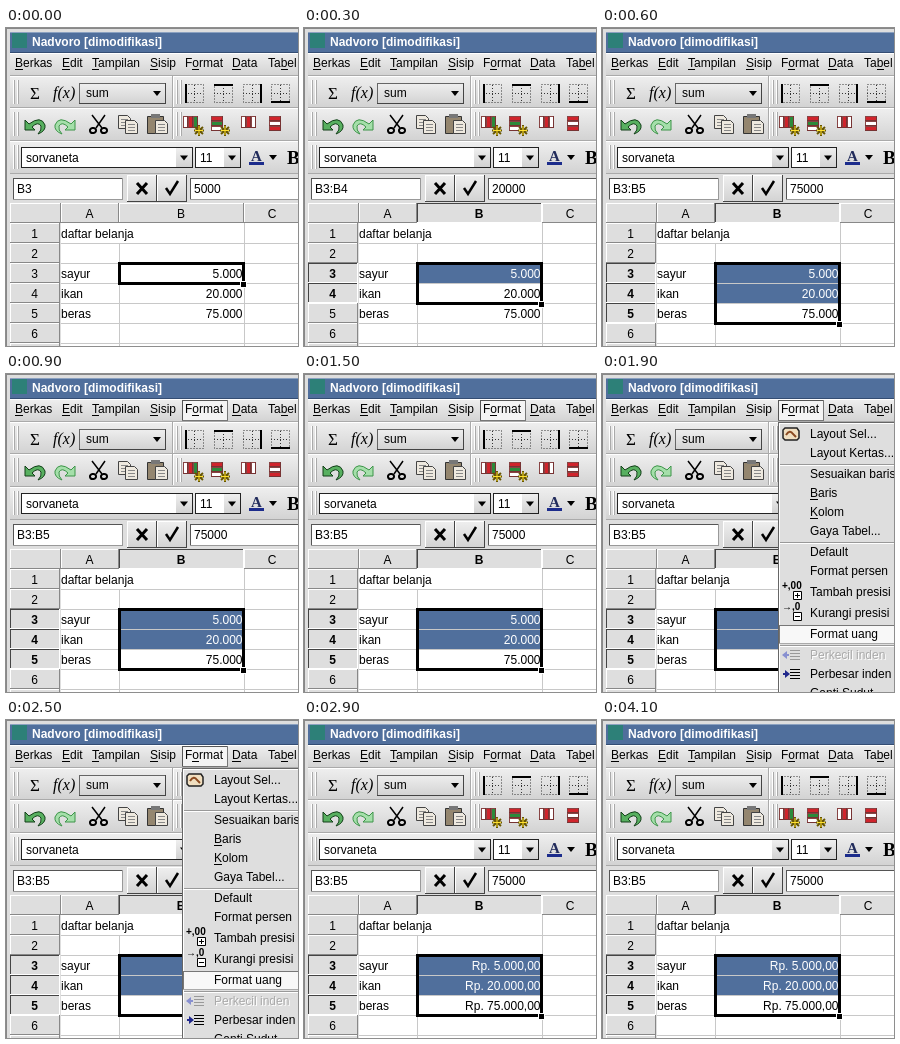
An HTML page with a canvas that plays this animation: 292x318 px, repeating every 4.9 s.

```html
<!DOCTYPE html>
<html lang="id">
<head>
<meta charset="utf-8">
<style>
html, body { margin: 0; width: 100%; height: 100%; overflow: hidden; }
canvas { display: block; }
</style>
</head>
<body>
<canvas width="292" height="318"></canvas>
<script>
const ctx = document.querySelector('canvas').getContext('2d');
const FACE = '#dedede', BLUE = '#506f9c', INK = '#000', GREEN = '#2b8a3a', RED = '#d0242c', LINE = '#c8c8c8';
const SANS = '"Liberation Sans", Arial, sans-serif';
const SERIF = '"Liberation Serif", serif';
const LOOP = 4900;

const steps = [
  { at: 0, last: 3, value: '5000' },
  { at: 300, last: 4, value: '20000' },
  { at: 600, last: 5, value: '75000' },
  { at: 900, last: 5, value: '75000', active: true },
  { at: 1900, last: 5, value: '75000', active: true, popup: true },
  { at: 2900, last: 5, value: '75000', money: true }
];

function box(x, y, w, h, color) {
  ctx.fillStyle = color;
  ctx.fillRect(x, y, w, h);
}

function shade(x, y, w, h, top = '#efefef', bottom = '#d2d2d2') {
  const g = ctx.createLinearGradient(0, y, 0, y + h);
  g.addColorStop(0, top);
  g.addColorStop(1, bottom);
  box(x, y, w, h, g);
}

function frame(x, y, w, h, light, dark) {
  box(x, y, w, 1, light);
  box(x, y, 1, h, light);
  box(x, y + h - 1, w, 1, dark);
  box(x + w - 1, y, 1, h, dark);
}

function text(s, x, y, { color = INK, align = 'left', style = '', size = 12, family = SANS } = {}) {
  ctx.font = `${style} ${size}px ${family}`;
  ctx.textAlign = align;
  ctx.fillStyle = color;
  ctx.fillText(s, x, y);
}

// Menu text with its shortcut letter underlined
function label(s, x, y, key) {
  text(s, x, y);
  if (key === undefined) return;
  const left = x + ctx.measureText(s.slice(0, key)).width;
  box(Math.round(left), y + 2, Math.round(ctx.measureText(s[key]).width), 1, INK);
}

function path(d, stroke, width = 1, fill) {
  const p = new Path2D(d);
  if (fill) { ctx.fillStyle = fill; ctx.fill(p); }
  if (stroke) { ctx.strokeStyle = stroke; ctx.lineWidth = width; ctx.stroke(p); }
}

function place(x, y, flip, draw) {
  ctx.save();
  ctx.translate(x, y);
  ctx.scale(flip, 1);
  draw();
  ctx.restore();
}

function arrow(x, y) {
  path(`M${x - 4} ${y - 2}h8l-4 5z`, null, 0, INK);
}

function field(x, y, w, h, s, pad = 4) {
  box(x, y, w, h, '#fff');
  frame(x, y, w, h, '#555', '#999');
  text(s, x + pad, y + h / 2 + 4);
}

function combo(x, y, w, h, s) {
  field(x, y, w, h, s, 5);
  frame(x, y, w, h, '#222', '#222');
  shade(x + w - 17, y + 1, 16, h - 2);
  arrow(x + w - 9, y + h / 2);
}

function bar(y, h) {
  shade(4, y, 288, h);
  box(4, y, 288, 1, '#fff');
  box(4, y + h - 1, 288, 1, '#aaa');
}

function handle(x, y) {
  for (const dx of [0, 4]) {
    box(x + dx, y, 1, 24, '#fff');
    box(x + dx + 1, y, 1, 24, '#aaa');
  }
}

function toolbar(y, h) {
  bar(y, h);
  handle(7, y + 4);
}

function divider(y) {
  box(166, y - 4, 1, 31, '#aaa');
  box(167, y - 4, 1, 31, '#fff');
  handle(170, y);
}

function titleBar() {
  box(4, 4, 288, 21, BLUE);
  box(4, 4, 288, 1, '#8ba1c0');
  box(4, 24, 288, 1, '#344d73');
  box(6, 5, 15, 15, '#2d8078');
  text('Nadvoro [dimodifikasi]', 26, 18, { color: '#fff', style: 'bold' });
}

function menuBar(active) {
  bar(25, 23);
  if (active) {
    box(176, 26, 46, 21, '#f4f4f4');
    frame(176, 26, 46, 21, '#555', '#777');
  }
  const items = [['Berkas', 9, 0], ['Edit', 56, 0], ['Tampilan', 86, 0], ['Sisip', 144, 0], ['Format', 179, 1], ['Data', 226, 0], ['Tabel', 262, 2]];
  for (const [s, x, key] of items) label(s, x, 39, key);
}

function borderIcon(x, side) {
  ctx.setLineDash([1, 2]);
  path(`M${x + .5} 56.5h18v18h-18zM${x + 9.5} 57v18M${x} 65.5h18`, '#333');
  ctx.setLineDash([]);
  const edges = [[0, 0, 2, 19], [0, 0, 19, 2], [17, 0, 2, 19], [0, 17, 19, 2]];
  const [dx, dy, w, h] = edges[side];
  box(x + dx, 56 + dy, w, h, INK);
}

function functionBar() {
  toolbar(48, 32);
  text('Σ', 24, 71, { size: 17, family: SERIF });
  text('f(x)', 47, 70, { size: 16, style: 'italic', family: SERIF });
  shade(73, 55, 87, 21);
  frame(73, 55, 87, 21, '#666', '#444');
  text('sum', 80, 69);
  arrow(151, 65);
  divider(52);
  [179, 208, 237, 265].forEach(borderIcon);
}

function curl(fill, edge) {
  path('M1 3V13H11L8 10Q14 4 17 9Q18 13 14 17Q22 14 21 8Q17 -2 5 7Z', edge, 1, fill);
}

function scissors() {
  path('M3 0L13 13M16 0L7 13', INK, 1.5);
  path('M7 15a3 2.500 0 1 1-6 1a3 2.500 0 0 1 6-1M18 15a3 2.500 0 1 1-6 1a3 2.500 0 0 1 6-1', INK, 2);
}

function sheet(x, y) {
  path(`M${x + .5} ${y + .5}h9l3 3v10h-12z`, '#444', 1, '#eee9df');
  for (let i = 4; i < 12; i += 3) box(x + 3, y + i, 7, 1, '#888');
}

function bars(x, upright, colors) {
  colors.forEach((c, i) => {
    const r = upright ? [x + i * 5, 88, 5, 12] : [x, 88 + i * 5, 12, 5];
    box(...r, c);
    frame(...r, '#844', '#733');
  });
}

function star(x) {
  path(`M${x} 97v11M${x - 5} 102.500h10M${x - 4} 99l8 7M${x + 4} 99l-8 7`, '#665500', 2);
  path(`M${x} 98v9M${x - 4} 102.500h8`, '#ffe030');
}

function editBar() {
  toolbar(80, 33);
  place(18, 89, 1, () => curl('#58b060', '#123f18'));
  place(70, 89, -1, () => curl('#a5dfaa', '#3c9448'));
  place(83, 87, 1, scissors);
  sheet(112, 87);
  sheet(119, 92);
  path('M141.500 88.500h16v17h-16z', '#333', 1, '#94866f');
  box(145, 86, 9, 4, '#777');
  sheet(149, 92);
  divider(84);
  bars(177, true, ['#fff', RED, GREEN]);
  star(193);
  bars(205, false, [RED, GREEN, '#fff']);
  star(219);
  bars(235, true, ['#fff', RED, '#fff']);
  bars(263, false, [RED, '#fff', RED]);
}

function fontBar() {
  toolbar(113, 33);
  combo(15, 119, 172, 21, 'sorvaneta');
  combo(189, 119, 46, 21, '11');
  text('A', 245, 133, { size: 15, style: 'bold', family: SERIF, color: '#222c5c' });
  box(243, 134, 15, 3, '#1c2c8c');
  arrow(267, 129);
  text('B', 281, 136, { size: 19, style: 'bold', family: SERIF });
}

function inputBar({ last, value }) {
  field(7, 150, 110, 22, last > 3 ? 'B3:B' + last : 'B3');
  for (const x of [121, 151]) {
    shade(x, 147, 30, 27);
    frame(x, 147, 30, 27, '#fff', '#444');
  }
  path('M131 155L141 166M141 155L131 166', INK, 3);
  path('M160 160l4 6l8 -13', INK, 2.5);
  field(184, 150, 116, 22, value);
}

function cells({ last, money }) {
  const many = last > 3;
  box(55, 195, 237, 123, '#fff');
  for (let y = 215; y < 318; y += 20) box(55, y, 237, 1, LINE);
  box(113, 216, 1, 102, LINE);
  box(238, 195, 1, 123, LINE);

  const header = (s, x, y, w, h, pressed) => {
    frame(x, y, w, h, ...(pressed ? ['#444', '#fff'] : ['#fff', '#888']));
    text(s, x + w / 2 - .5, y + 15, { align: 'center', style: pressed ? 'bold' : '' });
  };
  const columns = [['', 4, 51], ['A', 55, 58], ['B', 113, 125], ['C', 238, 57]];
  for (const [s, x, w] of columns) header(s, x, 175, w, 20, many && s === 'B');
  for (let row = 1; row < 8; row++) {
    header(row, 4, 175 + row * 20, 50, 20, many && row >= 3 && row <= last);
  }

  text('daftar belanja', 55, 210);
  const goods = [['sayur', '5.000'], ['ikan', '20.000'], ['beras', '75.000']];
  goods.forEach(([name, price], i) => {
    const y = 235 + i * 20, marked = i + 3 < last;
    if (marked) box(114, y + 1, 124, 19, BLUE);
    text(name, 55, y + 15);
    text(money ? `Rp. ${price},00` : price, 236.5, y + 15, { align: 'right', color: marked ? '#fff' : INK });
  });

  const bottom = 197 + last * 20;
  ctx.strokeStyle = INK;
  ctx.lineWidth = 3;
  ctx.strokeRect(113.5, 235.5, 124, bottom - 237);
  box(234, bottom - 4, 7, 7, '#fff');
  box(235, bottom - 3, 5, 5, INK);
}

function indent(y, color, tip, dir) {
  for (let i = -5; i < 6; i += 3) box(188, y + i, 10, 1, color);
  path(`M${184 + dir * 4} ${y}l${-dir * 5} -4v8z`, null, 0, tip);
  box(181, y - 1, 6, 2, tip);
}

function digitIcon(s, y, sign) {
  text(s, 180, y, { size: 10, style: 'bold' });
  path(`M191.500 ${y + 2.5}h8v8h-8z`, INK, 1, '#fff');
  path(`M193 ${y + 6.5}h5` + (sign === '+' ? `M195.500 ${y + 4}v5` : ''), INK);
}

function popup() {
  box(176, 48, 130, 280, FACE);
  frame(176, 48, 130, 280, '#666', '#666');
  box(177, 49, 115, 1, '#fff');
  box(177, 49, 1, 269, '#fff');
  box(177, 251, 115, 19, '#f8f8f8');
  frame(177, 251, 120, 19, '#777', '#aaa');
  const items = [
    ['Layout Sel...', 64], ['Layout Kertas...', 83], ['Sesuaikan baris', 104], ['Baris', 123, 0],
    ['Kolom', 142, 0], ['Gaya Tabel...', 161], ['Default', 182], ['Format persen', 201],
    ['Tambah presisi', 222], ['Kurangi presisi', 243], ['Format uang', 264],
    ['Perbesar inden', 304], ['Ganti Sudut...', 323]
  ];
  for (const item of items) label(item[0], 208, item[1], item[2]);
  text('Perkecil inden', 209, 286, { color: '#fff' });
  text('Perkecil inden', 208, 285, { color: '#aaa' });
  for (const y of [90, 168, 271]) {
    box(178, y, 114, 1, '#999');
    box(178, y + 1, 114, 1, '#fff');
  }
  path('M183 54h12l2 3v7l-2 2h-12l-2 -2v-8z', '#222', 1.5, '#f1dfc0');
  path('M184 61q4 -6 7 -1l3 3', '#8c4a20', 2);
  digitIcon('+,00', 215, '+');
  digitIcon('→,0', 236, '-');
  indent(281, '#999', '#8890d0', -1);
  indent(300, INK, '#20288c', 1);
}

function draw(step) {
  box(0, 0, 292, 318, FACE);
  frame(0, 0, 300, 330, '#888', '#888');
  titleBar();
  menuBar(step.active);
  functionBar();
  editBar();
  fontBar();
  inputBar(step);
  cells(step);
  if (step.popup) popup();
}

function tick() {
  const t = performance.now() % LOOP;
  draw(steps.findLast(s => s.at <= t));
  requestAnimationFrame(tick);
}
tick();
</script>
</body>
</html>
```
